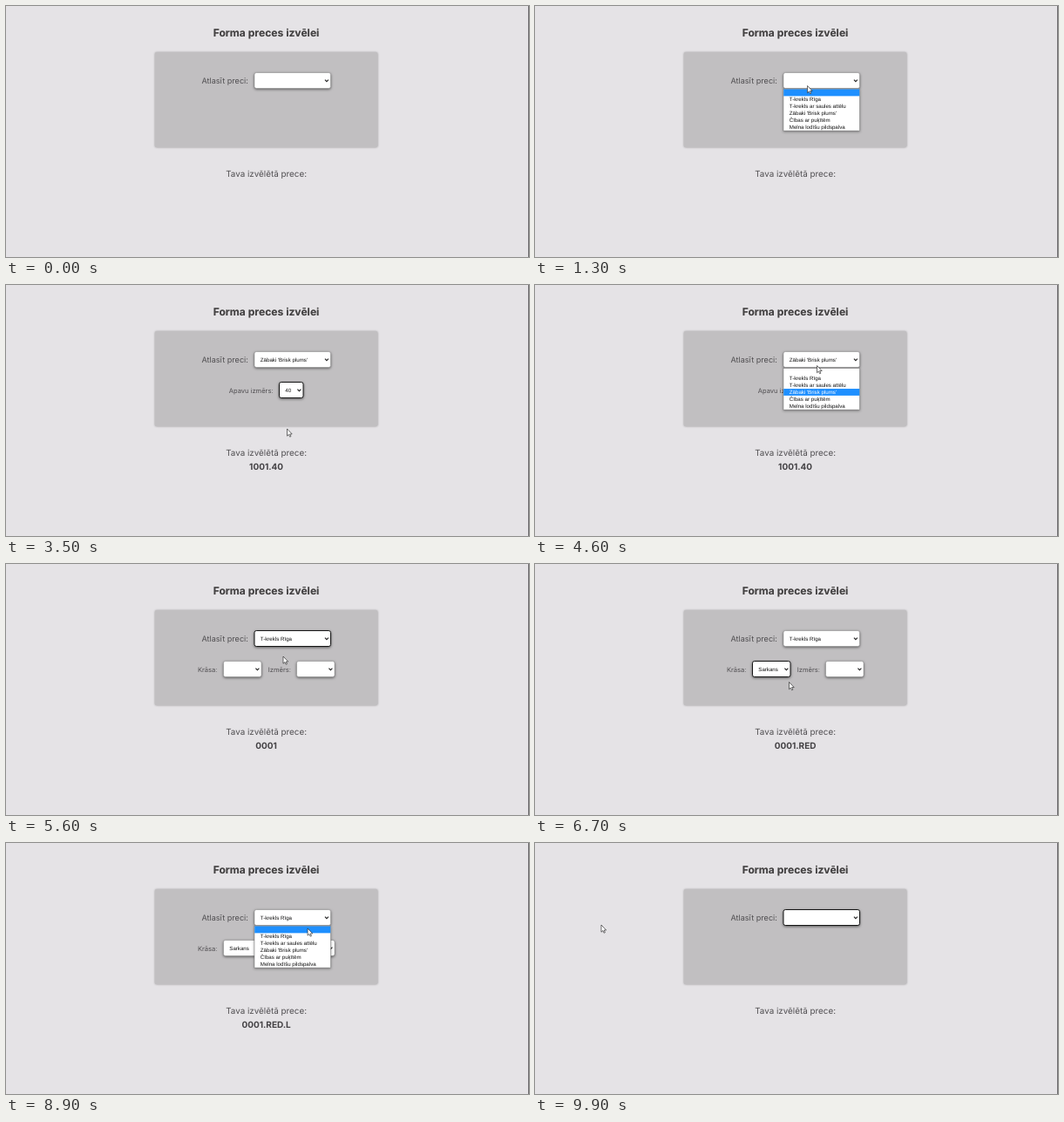
An HTML page for the animation above (10 s loop, 600 by 288 pixels).

```html
<!DOCTYPE html>
<html lang="lv">
<head>
<meta charset="utf-8">
<title>Forma preces izvēlei</title>
<style>
html, body { margin: 0; width: 100%; height: 100%; overflow: hidden; background: #e5e3e6; }
svg { display: block; width: 600px; height: 288px; }
text { font-family: Inter, sans-serif; fill: #504e51; white-space: pre; text-rendering: geometricPrecision; }
.mid { text-anchor: middle; }
.title { font-size: 12.1px; font-weight: 700; fill: #434143; filter: drop-shadow(.9px .9px .5px #aaa8a2); }
.lead { font-size: 9.07px; }
.label { font-size: 7.56px; }
.sum { font-size: 9.83px; }
.code { font-size: 10px; font-weight: 700; fill: #434144; }
.opt { font: 6.15px "Liberation Sans", Arial, sans-serif; fill: #111; }
.opt.on { fill: #fff; }
.panel { fill: #c1bfc1; filter: drop-shadow(0 .5px 1.2px rgba(0, 0, 0, .3)); }
.box { fill: #fff; stroke: #858585; stroke-width: .5; filter: drop-shadow(.5px 1.6px 1.4px rgba(0, 0, 0, .55)); }
.box.focus { stroke: #151515; stroke-width: 1; }
.popup { fill: #fff; stroke: #777; stroke-width: .5; filter: drop-shadow(.5px 1px 1.5px rgba(0, 0, 0, .4)); }
.arrow { fill: none; stroke: #222; stroke-width: 1.1; }
.cursor { fill: #fff; stroke: #222; stroke-width: .65; stroke-linejoin: round; }
</style>
</head>
<body>
<svg viewBox="0 0 600 288">
  <rect x="599" width="1" height="288" fill="#6b696c"/>
  <text class="title mid" x="298.5" y="35.2">Forma preces izvēlei</text>
  <rect class="panel" x="170.8" y="53" width="255.6" height="109.3" rx="2"/>
  <text class="lead mid" x="251.2" y="89.4">Atlasīt preci:</text>
  <text class="sum mid" x="298.6" y="195.5">Tava izvēlētā prece:</text>
  <g id="live"></g>
</svg>
<script>
const LOOP = 10000, STEP = 100, ROW = 7.85, HEIGHT = 18;
const MOVE = 500, REST = 100; // pointer glide, and its pause before a click

const fields = {
  item: { x: 285, y: 76.5, w: 87.5, options: ["", "T-krekls Rīga", "T-krekls ar saules attēlu",
    "Zābaki 'Brisk plums'", "Čības ar puķītēm", "Melna lodīšu pildspalva"] },
  shoe: { x: 313.5, y: 111.5, w: 27.5, label: "Apavu izmērs:", labelX: 281.2,
    options: ["", "37", "38", "39", "40", "41", "42", "43", "44"] },
  color: { x: 249.5, y: 111.5, w: 43.5, label: "Krāsa:", labelX: 231.2,
    options: ["", "Sarkans", "Melns", "Balts"] },
  size: { x: 333.5, y: 111.5, w: 43.5, label: "Izmērs:", labelX: 313.8,
    options: ["", "Small", "Medium", "Large"] }
};
const itemCodes = ["", "0001", "0002", "1001", "1002", "2001"];
const colorCodes = ["", ".RED", ".BLACK", ".WHITE"];
const sizeCodes = ["", ".S", ".M", ".L"];

// The pointer visits these places; a click opens the field or picks a row of its list.
const visits = [
  { at: 300, x: 32, y: 268 },
  { at: 900, x: 312.5, y: 91.5 },
  { at: 1300, x: 312.5, y: 91.5, field: "item" },
  { at: 1900, x: 316, y: 121, field: "item", pick: 3 },
  { at: 2600, x: 324, y: 122.5, field: "shoe" },
  { at: 3500, x: 322.5, y: 165, field: "shoe", pick: 4 },
  { at: 4600, x: 323.5, y: 92.5, field: "item" },
  { at: 5300, x: 318, y: 106, field: "item", pick: 1 },
  { at: 6200, x: 277, y: 121, field: "color" },
  { at: 6700, x: 291.5, y: 135.5, field: "color", pick: 1 },
  { at: 7300, x: 352, y: 121, field: "size" },
  { at: 7800, x: 350, y: 157, field: "size", pick: 3 },
  { at: 8500, x: 351, y: 90.5, field: "item" },
  { at: 9100, x: 346, y: 98, field: "item", pick: 0 },
  { at: 10000, x: 76, y: 94, lift: 94 }
];

function pointerAt(t) {
  if (t < visits[0].at) return null;
  const i = visits.findIndex(v => v.at > t);
  const from = visits[i - 1], to = visits[i];
  const u = Math.min(1, Math.max(0, (t - to.at + MOVE + REST) / MOVE));
  const k = 1 - (1 - u) ** 3;
  const lift = (to.lift || 0) * Math.sin(Math.PI * k);
  return [from.x + (to.x - from.x) * k, from.y + (to.y - from.y) * k - lift];
}

function stateAt(t) {
  const s = { item: 0, shoe: 0, color: 0, size: 0, focus: null, open: null };
  for (const { at, field, pick } of visits) {
    if (at > t) break;
    if (!field) continue;
    s.focus = field;
    s.open = pick === undefined ? field : null;
    s[field] = pick ?? s[field];
  }
  return s;
}

const text = (cls, x, y, str) => `<text class="${cls}" x="${x}" y="${y}">${str}</text>`;

function select(key, s) {
  const { x, y, w, label, labelX, options } = fields[key];
  const focus = s.focus === key && !s.open ? " focus" : "";
  return (label ? text("label mid", labelX, 124.1, label) : "") +
    `<rect class="box${focus}" x="${x}" y="${y}" width="${w}" height="${HEIGHT}" rx="2.3"/>` +
    text("opt", x + 6.8, y + 11.5, options[s[key]]) +
    `<path class="arrow" d="M${x + w - 6.6} ${y + 8.2}l2 2l2-2"/>`;
}

function popup(key, s, pointer) {
  const { x, y, w, options } = fields[key];
  const top = y + HEIGHT + 1;
  const hover = Math.floor((pointer[1] - top) / ROW);
  const active = hover in options ? hover : s[key];
  return `<rect class="popup" x="${x}" y="${top}" width="${w}" height="${options.length * ROW + .5}"/>` +
    `<rect x="${x + .2}" y="${top + active * ROW}" width="${w - .4}" height="${ROW}" fill="#1e8fff"/>` +
    options.map((o, i) => text(i === active ? "opt on" : "opt", x + 6.8, top + i * ROW + 6, o)).join("");
}

function render(t) {
  const s = stateAt(t), pointer = pointerAt(t);
  const shown = ["item"];
  if (s.item === 1 || s.item === 2) shown.push("color", "size");
  if (s.item === 3 || s.item === 4) shown.push("shoe");

  let code = itemCodes[s.item];
  if (shown.includes("shoe") && s.shoe) code += "." + fields.shoe.options[s.shoe];
  if (shown.includes("color")) code += colorCodes[s.color] + sizeCodes[s.size];

  let out = shown.map(key => select(key, s)).join("") + text("code mid", 298.6, 212.2, code);
  if (s.open) out += popup(s.open, s, pointer);
  if (pointer) out += `<path class="cursor" transform="translate(${pointer})"
    d="M0 0V8.2L1.9 6.5L3.1 9.2L4.4 8.7L3.2 6H5.7Z"/>`;
  document.getElementById("live").innerHTML = out;
}

const start = performance.now();
let last = -1;
function frame() {
  const elapsed = (performance.now() - start) % LOOP;
  const t = Math.floor(elapsed / STEP) * STEP;
  if (t !== last) render(last = t);
  requestAnimationFrame(frame);
}
frame();
</script>
</body>
</html>
```
